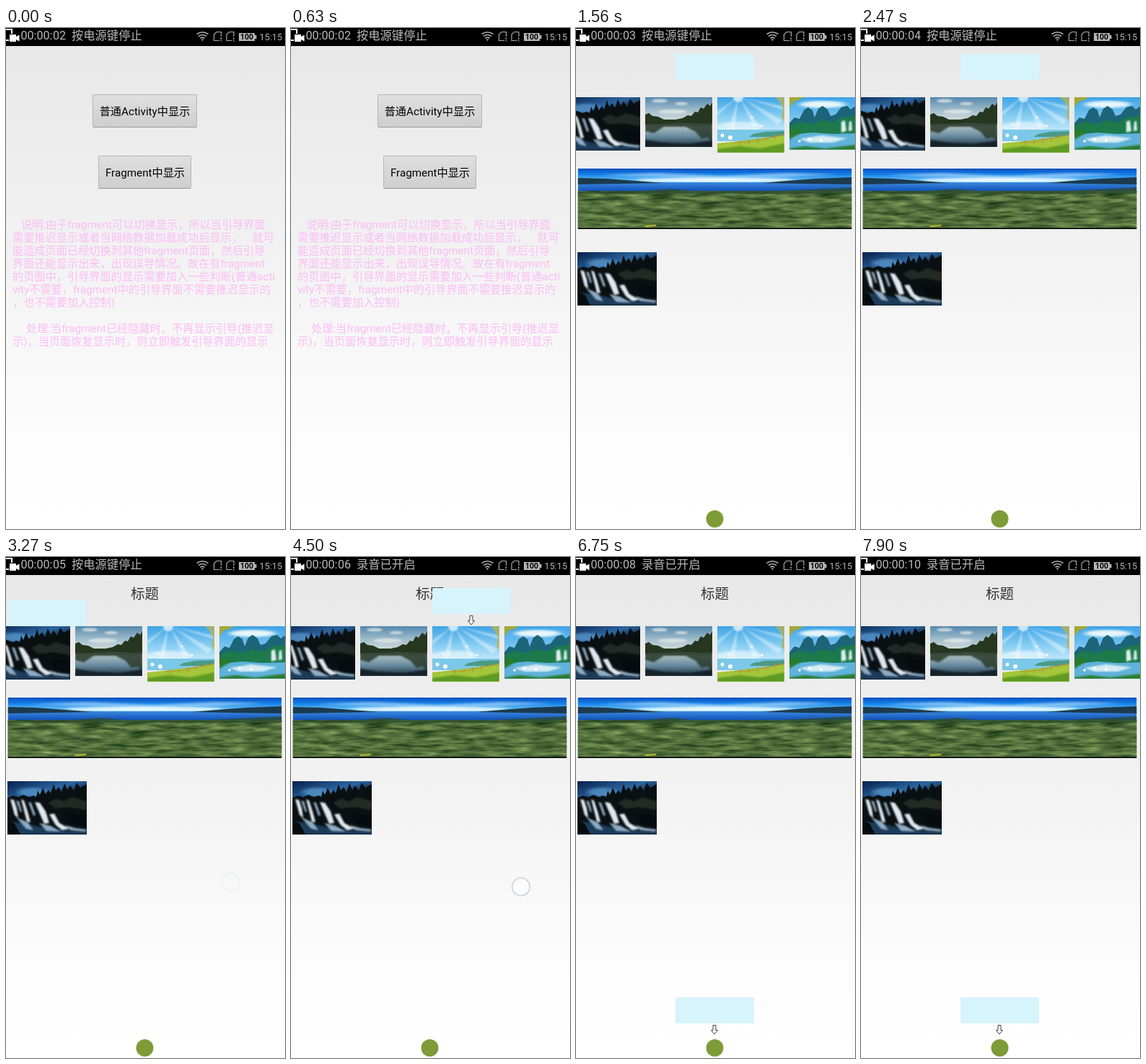
An HTML page for the animation above (8 s loop, 387 px wide and 695 px high).

```html
<!DOCTYPE html>
<html lang="zh-CN">
<head>
<meta charset="utf-8">
<title>引导界面</title>
<style>
html, body { margin: 0; width: 100%; height: 100%; overflow: hidden; background: #fff; }
svg { display: block; }
#stage { width: 387px; height: 695px; }
text { font-family: Roboto, "Noto Sans CJK SC", "Noto Sans CJK", sans-serif; white-space: pre; }
.note { font-size: 15.2px; fill: #fcbcf6; }
.label { font-size: 15.2px; text-anchor: middle; fill: #000; }
.status { font-size: 16.1px; fill: #b8b8b8; }
.msg { font-size: 16.3px; }
.title { font-size: 19.5px; text-anchor: middle; fill: #333; }

/* One loop is 8 s, so 1% is 80 ms. */
.anim { animation: 8s step-end infinite; }
#page { animation-name: page; }
#press { animation-name: press; }
#secs { animation-name: secs; }
#msg1 { animation-name: msg1; }
#msg2 { animation-name: msg2; }
#tip { animation-name: tip; }
#arrow { animation-name: arrow; }
#ring { animation-name: ring; }

@keyframes page { 0% { opacity: 0 } 8.875% { opacity: .6 } 9.75%, 100% { opacity: 1 } }
@keyframes press { 0% { opacity: 0 } 2.125% { opacity: 1 } 5.875%, 100% { opacity: 0 } }
@keyframes msg1 { 0% { opacity: 1 } 49.625%, 100% { opacity: 0 } }
@keyframes msg2 { 0% { opacity: 0 } 49.625%, 100% { opacity: 1 } }
@keyframes secs {
  0% { transform: translateY(0) }
  19.5% { transform: translateY(-24px) }
  30% { transform: translateY(-48px) }
  37.75% { transform: translateY(-72px) }
  49.625% { transform: translateY(-96px) }
  62% { transform: translateY(-120px) }
  74.75% { transform: translateY(-144px) }
  92.875% { transform: translateY(-168px) }
  98.75%, 100% { transform: translateY(-192px) }
}
@keyframes tip {
  0% { opacity: 0; transform: translate(138px, 36px) }
  19.5% { opacity: 1; transform: translate(138px, 36px) }
  39.625% { opacity: 1; transform: translate(2px, 60px) }
  49.5% { opacity: 1; transform: translate(196px, 43px) }
  58.25% { opacity: 1; transform: translate(241px, 43px) }
  66.125% { opacity: 1; transform: translate(138px, 219px) }
  74.75% { opacity: 1; transform: translate(2px, 330px) }
  83.375%, 100% { opacity: 1; transform: translate(138px, 611px) }
}
@keyframes arrow {
  0% { opacity: 0 } 49.5% { opacity: 1 } 66.125% { opacity: 0 } 83.375%, 100% { opacity: 1 }
}
@keyframes ring {
  0% { opacity: 0; transform: translate(261px, 125px) }
  2.125% { opacity: 1; transform: translate(261px, 125px) }
  3.75% { opacity: 0; transform: translate(261px, 125px) }
  37.75% { opacity: 1; transform: translate(312px, 451.5px) }
  40.875% { opacity: .22; transform: translate(312px, 451.5px) }
  47.5% { opacity: 1; transform: translate(315px, 454px) }
  49.5% { opacity: .5; transform: translate(315px, 454px) }
  50.625% { opacity: 0; transform: translate(315px, 454px) }
  56.25% { opacity: 1; transform: translate(319px, 457.5px) }
  58.25% { opacity: .5; transform: translate(319px, 457.5px) }
  59.25% { opacity: 0; transform: translate(319px, 457.5px) }
  64.875% { opacity: 1; transform: translate(322px, 458px) }
  66.125% { opacity: .5; transform: translate(322px, 458px) }
  67.125% { opacity: 0; transform: translate(322px, 458px) }
  73.5% { opacity: 1; transform: translate(327px, 466px) }
  74.75% { opacity: .5; transform: translate(327px, 466px) }
  75.75% { opacity: 0; transform: translate(327px, 466px) }
  81.375% { opacity: 1; transform: translate(327px, 466px) }
  83.375% { opacity: .5; transform: translate(327px, 466px) }
  84.375%, 100% { opacity: 0; transform: translate(327px, 466px) }
}
</style>
</head>
<body>
<svg id="stage" viewBox="0 0 387 695">
<defs>
  <linearGradient id="bg" x2="0" y2="1">
    <stop stop-color="#e7e7e7"/><stop offset=".45" stop-color="#f2f2f2"/>
    <stop offset=".8" stop-color="#fcfcfc"/><stop offset="1" stop-color="#fff"/>
  </linearGradient>
  <linearGradient id="btn" x2="0" y2="1"><stop stop-color="#e0e0e0"/><stop offset="1" stop-color="#cecece"/></linearGradient>
  <linearGradient id="night" x2=".5" y2="1"><stop stop-color="#061f4a"/><stop offset=".35" stop-color="#2c66a0"/><stop offset=".6" stop-color="#0a1420"/></linearGradient>
  <linearGradient id="cloudy" x2="0" y2="1"><stop stop-color="#5487ad"/><stop offset=".5" stop-color="#9fbccb"/><stop offset="1" stop-color="#dfe6e0"/></linearGradient>
  <linearGradient id="lake" x2="0" y2="1"><stop stop-color="#2a3826"/><stop offset=".2" stop-color="#a9bcc0"/><stop offset=".6" stop-color="#64879c"/><stop offset="1" stop-color="#1c2d38"/></linearGradient>
  <linearGradient id="sunny" x2="0" y2="1"><stop stop-color="#3fa4e6"/><stop offset=".55" stop-color="#8fd2f4"/><stop offset="1" stop-color="#d8f2fa"/></linearGradient>
  <linearGradient id="deep" x2="0" y2="1"><stop stop-color="#0a4fc0"/><stop offset=".4" stop-color="#1583ea"/><stop offset=".75" stop-color="#6cc4f4"/><stop offset="1" stop-color="#c5ecfa"/></linearGradient>
  <linearGradient id="water" x2="0" y2="1"><stop stop-color="#3b8ade"/><stop offset="1" stop-color="#0b48b4"/></linearGradient>
  <filter id="grass" x="0" y="0" width="1" height="1" color-interpolation-filters="sRGB">
    <feTurbulence type="fractalNoise" baseFrequency=".03 .2" numOctaves="3" seed="4"/>
    <feColorMatrix values=".6 0 0 0 .02  .6 0 0 0 .13  .4 0 0 0 .03  0 0 0 0 1"/>
  </filter>
  <filter id="soft"><feGaussianBlur stdDeviation=".8"/></filter>
  <filter id="haze"><feGaussianBlur stdDeviation="4 1.5"/></filter>
  <clipPath id="secsClip"><rect x="64" y="1" width="21" height="20"/></clipPath>

  <symbol id="falls" width="110" height="74" viewBox="0 0 110 74">
    <rect width="110" height="74" fill="url(#night)"/>
    <ellipse cx="34" cy="15" rx="20" ry="6" fill="#5d9bcf" opacity=".7" filter="url(#haze)"/>
    <path fill="#0a1012" d="M0 23 8 20 15 22 22 19 30 22 36 20 40 22 42 13 45 19 49 9 53 18 57 12 60 17 64 4 67 13 71 8 75 15 79 3 83 12 87 6 92 13 96 2 101 9 110 4V74H0Z"/>
    <path fill="#222c28" filter="url(#soft)" d="M56 30 68 24 78 28 90 22 110 28V40L86 36 66 38Z"/>
    <path fill="#1a3a58" filter="url(#soft)" d="M0 56 24 58 48 64 80 68 110 70V74H0Z"/>
    <g filter="url(#soft)">
      <path fill="#dfe8f0" d="M4 25 9 26 13 38 15 51 10 47ZM19 25 23 27 28 42 32 57 27 56ZM38 29 45 30 53 42 58 58 51 59 44 43ZM58 46 65 45 72 58 86 66 76 68 67 61Z"/>
      <path fill="#8fabc4" d="M12 50 28 57 36 68 26 66ZM29 29 33 30 39 47 36 48ZM44 58 60 62 74 70 54 69ZM80 61 94 65 110 67 108 70 87 68ZM12 27 16 28 20 42 18 43Z"/>
    </g>
    <path fill="#060b10" d="M0 54 10 59 18 74H0ZM82 44 110 48V64L88 59Z"/>
  </symbol>
</defs>

<rect width="387" height="695" fill="url(#bg)"/>

<g id="home">
  <g stroke="#b4b4b4">
    <rect x="120.5" y="92.5" width="144" height="45" rx="1.5" fill="url(#btn)"/>
    <rect x="128.5" y="177.5" width="128" height="45" rx="1.5" fill="url(#btn)"/>
    <path stroke="#999" d="M121 137.5H264M129 222.5H256"/>
  </g>
  <rect id="press" class="anim" x="120.5" y="92.5" width="144" height="45" rx="1.5" fill="#a5d3e6" stroke="#7fbfd8"/>
  <text class="label" x="192.5" y="120.5">普通Activity中显示</text>
  <text class="label" x="193" y="205.5">Fragment中显示</text>
  <g class="note">
    <text x="21" y="278">说明:由于fragment可以切换显示，所以当引导界面</text>
    <text x="9" y="296">需要推迟显示或者当网络数据加载成功后显示，<tspan x="341.5">就可</tspan></text>
    <text x="9" y="314">能造成页面已经切换到其他fragment页面，然后引导</text>
    <text x="9" y="332">界面还能显示出来，出现误导情况。故在有fragment</text>
    <text x="9" y="350">的页面中，引导界面的显示需要加入一些判断(普通acti</text>
    <text x="9" y="368">vity不需要，fragment中的引导界面不需要推迟显示的</text>
    <text x="9" y="386">，也不需要加入控制)</text>
    <text x="28" y="422">处理:当fragment已经隐藏时，不再显示引导(推迟显</text>
    <text x="9" y="440">示)，当页面恢复显示时，则立即触发引导界面的显示</text>
  </g>
</g>

<g id="page" class="anim">
  <rect width="387" height="695" fill="url(#bg)"/>
  <text class="title" x="192.5" y="57.5">标题</text>

  <use href="#falls" x="-21" y="96"/>
  <use href="#falls" x="2" y="311"/>

  <svg x="96" y="96" width="93" height="69">
    <rect width="93" height="36" fill="url(#cloudy)"/>
    <g fill="#e6ebe8" opacity=".75" filter="url(#soft)">
      <ellipse cx="20" cy="5" rx="11" ry="2.5"/><ellipse cx="50" cy="9" rx="9" ry="2"/><ellipse cx="38" cy="20" rx="20" ry="3"/>
    </g>
    <rect y="34" width="93" height="35" fill="url(#lake)"/>
    <path fill="#26361f" d="M0 24 5 22 10 26 18 27 26 31 42 31 52 29 59 25 64 26 69 20 73 21 77 14 81 16 86 9 90 12 93 7V37L50 36 0 38Z"/>
    <g filter="url(#soft)">
      <path fill="#2b3a2a" opacity=".85" d="M0 37 30 36 60 36 93 36V62L86 56 78 58 70 48 56 41 26 41 12 50 0 47Z"/>
      <path fill="#12202a" d="M0 59 24 63 60 65 93 60V69H0Z"/>
    </g>
  </svg>

  <svg x="196" y="96" width="93" height="77">
    <rect width="93" height="54" fill="url(#sunny)"/>
    <g fill="#fff" filter="url(#soft)">
      <path opacity=".4" d="M28 0 0 26V20ZM29 0 16 44 24 44ZM31 0 50 42 58 40ZM33 0 84 38 90 32ZM34 0 93 18V13Z"/>
      <circle cx="29" cy="0" r="7" opacity=".7"/>
      <ellipse cx="30" cy="41" rx="32" ry="7" opacity=".45"/>
    </g>
    <rect y="45" width="93" height="16" fill="#7cc8e8"/>
    <path fill="#4b9a86" d="M50 51 66 48 93 47V55H44Z"/>
    <path fill="#a3c63a" d="M0 64 30 61 60 57 93 53V77H0Z"/>
    <path fill="#5f9a22" filter="url(#soft)" d="M0 72 30 68 60 71 93 64V77H0Z"/>
    <path fill="none" stroke="#b98f3a" stroke-width="1.2" d="M24 63 50 61 93 52M32 60V66M44 59V65M56 57V64M68 54V61M80 52V58"/>
    <path fill="#b5b356" opacity=".8" d="M80 0H93V34L89 27 91 15 86 6Z"/>
    <g fill="#fff"><circle cx="15" cy="38" r="1.5"/><circle cx="48" cy="28" r="1.4"/><circle cx="62" cy="40" r="1.5"/><circle cx="7" cy="53" r="2.5"/><circle cx="18" cy="56" r="3"/></g>
  </svg>

  <svg x="296" y="96" width="92" height="73">
    <rect width="92" height="73" fill="url(#sunny)"/>
    <ellipse cx="46" cy="10" rx="32" ry="5" fill="#e7f6fa" filter="url(#haze)"/>
    <path fill="#1d6478" d="M0 36 7 28 14 30 20 18 26 14 32 18 35 28 40 16 46 12 53 17 57 26 64 24 72 14 80 12 85 17 92 12V52H0Z"/>
    <path fill="#1f7a4c" filter="url(#soft)" d="M0 40 14 34 30 37 46 32 60 35 73 28 92 26V54H0Z"/>
    <path fill="#dff0f2" filter="url(#soft)" d="M72 34 77 32 79 47 72 49ZM83 34 86 33 87 46 82 47Z"/>
    <path fill="#5fb2da" d="M0 52 32 49 60 51 92 50V73H0Z"/>
    <path fill="#d4ecf4" filter="url(#soft)" d="M14 58 44 53 80 57 60 63 28 63Z"/>
    <path fill="#2a7a2c" filter="url(#soft)" d="M0 46 10 44 16 50 8 54 0 59ZM0 71 22 68 50 71 92 66V73H0Z"/>
    <path fill="#a3a83a" d="M0 0H20L13 4 6 6 0 14Z"/>
    <g fill="#fff"><circle cx="28" cy="58" r="2"/><circle cx="44" cy="60" r="2"/><circle cx="14" cy="61" r="1.8"/></g>
  </svg>

  <svg x="2.5" y="195" width="380" height="84">
    <rect width="380" height="22" fill="url(#deep)"/>
    <g fill="#eafaff" filter="url(#haze)">
      <ellipse cx="190" cy="16" rx="110" ry="3"/>
      <path opacity=".5" d="M30 9 110 6 200 10 290 6 360 8 280 12 180 13 90 11Z"/>
    </g>
    <rect y="19" width="380" height="14" fill="url(#water)"/>
    <path fill="#1c3a4e" d="M0 13 40 14 80 17 120 20 60 21 0 22ZM380 12 330 14 290 17 255 20 310 21 380 22Z"/>
    <rect y="31" width="380" height="52" filter="url(#grass)"/>
    <path fill="#2c4a2c" opacity=".75" d="M0 32 90 31 130 28 160 31 280 31 380 26V35H0Z"/>
    <path fill="#b9b82c" d="M92 79 109 78 108 80 94 81Z"/>
    <rect y="82" width="380" height="2" fill="#101a14"/>
  </svg>

  <circle cx="192.5" cy="681" r="12" fill="#7d9c38"/>

  <g id="tip" class="anim">
    <rect width="109" height="36" fill="#d7f3fc"/>
    <path id="arrow" class="anim" d="M52 38.5H56V45.5H58.5L54 51 49.5 45.5H52Z" fill="#f6f6f6" stroke="#444"/>
  </g>
</g>

<g id="ring" class="anim">
  <circle r="12.2" fill="#fff" fill-opacity=".5" stroke="#c3d0dc" stroke-width="1.5"/>
</g>

<g id="bar">
  <rect width="387" height="25" fill="#000"/>
  <path fill="none" stroke="#fff" stroke-width="2" d="M0 2H8V8M0 17H4"/>
  <path fill="#fff" d="M5 9H14V12L18.5 9.5V18.5L14 16V19H5Z"/>
  <text class="status" x="20.5" y="15.5">00:00:</text>
  <g clip-path="url(#secsClip)">
    <g id="secs" class="anim status">
      <text x="65" y="15.5">02</text>
      <text x="65" y="39.5">03</text>
      <text x="65" y="63.5">04</text>
      <text x="65" y="87.5">05</text>
      <text x="65" y="111.5">06</text>
      <text x="65" y="135.5">07</text>
      <text x="65" y="159.5">08</text>
      <text x="65" y="183.5">09</text>
      <text x="65" y="207.5">10</text>
    </g>
  </g>
  <text id="msg1" class="status msg anim" x="91" y="15.5">按电源键停止</text>
  <text id="msg2" class="status msg anim" x="91" y="15.5">录音已开启</text>

  <g fill="none" stroke="#a8a8a8" stroke-width="1.6">
    <path d="M264.5 8.5Q272.5 3 280.5 8.5M267 11.5Q272.5 7.5 278 11.5M269.5 14.3Q272.5 12 275.5 14.3"/>
    <path stroke-width="1.2" d="M296 17.5H288.5V9L292 5.5H298.5V12M313.5 17.5H306V9L309.5 5.5H316V12"/>
  </g>
  <path fill="#a8a8a8" d="M270.5 15.5H274.5L272.5 18ZM297.5 13.5H299V16H297.5ZM297.5 17H299V18.5H297.5ZM315 13.5H316.5V16H315ZM315 17H316.5V18.5H315Z"/>
  <path fill="#b4b4b4" d="M323 7H345V10H347.5V15H345V18H323Z"/>
  <text x="334" y="16.3" text-anchor="middle" font-size="10.5" font-weight="700">100</text>
  <text x="351.5" y="17" font-size="12.7" fill="#b4b4b4">15:15</text>
</g>
</svg>
</body>
</html>
```
